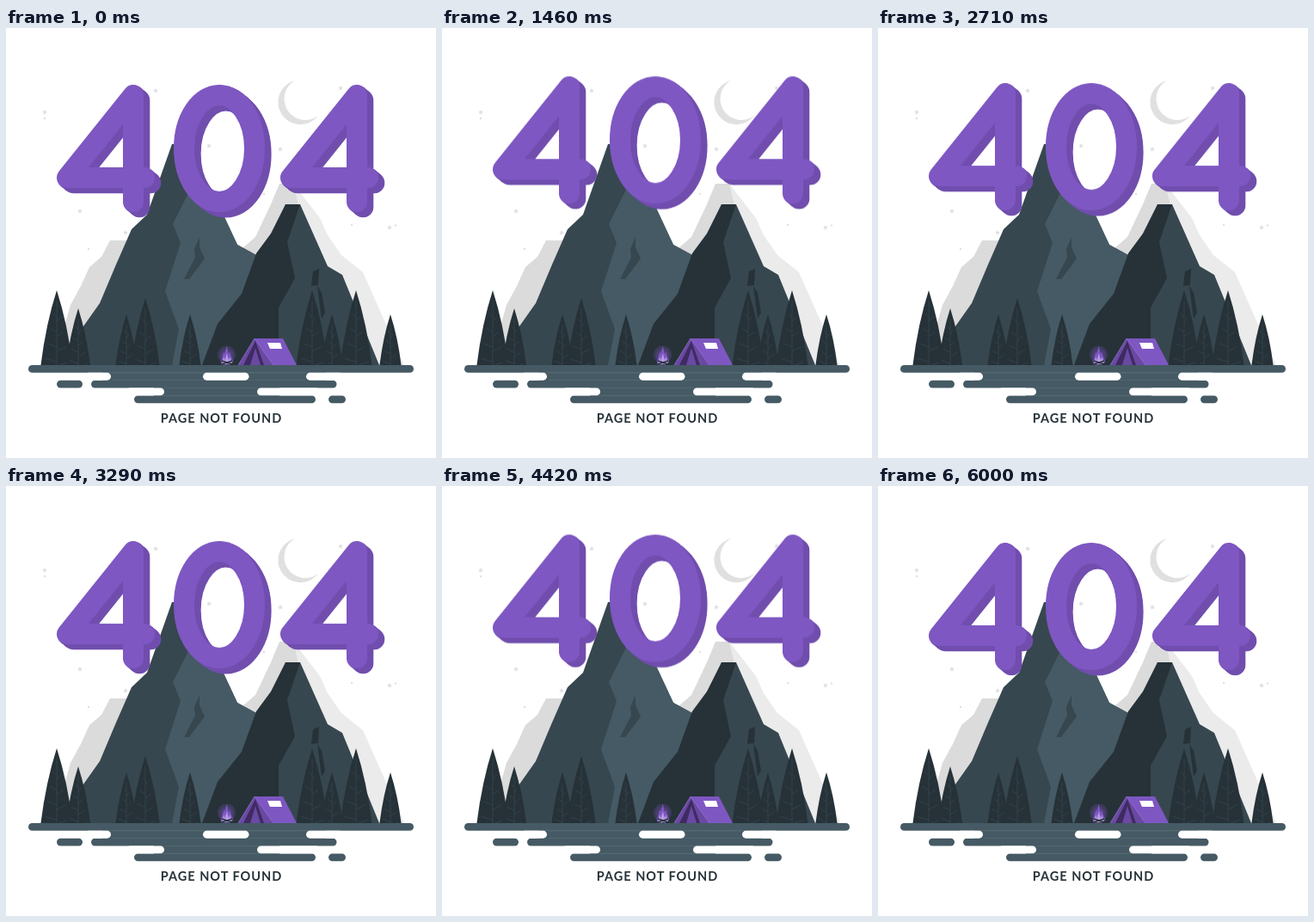
Recreate the animation shown at these times as an HTML page. Size 500 by 500 pixels, loop 6.04 s.

```html
<!DOCTYPE html>
<html lang="en">
<head>
<meta charset="utf-8">
<title>Page not found</title>
<style>
html, body { margin: 0; width: 100%; height: 100%; overflow: hidden; background: #fff; }
svg { display: block; width: 100vw; height: 100vh; }
.caption { font: 700 14.5px Lato, "Open Sans", sans-serif; letter-spacing: 1px; fill: #263238; }
#flame { transform-box: fill-box; transform-origin: center; }
</style>
</head>
<body>
<svg viewBox="0 0 500 500">
  <defs>
    <path id="four" d="M148 202V78L71 174H161" fill="none" stroke-width="24" stroke-linecap="round" stroke-linejoin="round"/>
    <ellipse id="zero" cx="248" cy="140" rx="41" ry="62" fill="none" stroke-width="24"/>
    <path id="tongue" d="M257 370Q258 378 261 383T257 391T253 383T257 370Z"/>
  </defs>

  <g id="sky" fill="#e0e0e0">
    <path d="M336 61A26 26 0 1 0 363 102A24.600 24.600 0 1 1 336 61Z"/>
  </g>

  <!-- far peaks -->
  <path fill="#dbdbdb" d="M121 247H146V392H55L75 322L87 300L97 278L111 266Z"/>
  <path fill="#ebebeb" d="M318 181H334L365 221L374 241L390 264L415 284L463 392H330Z"/>
  <path fill="#dbdbdb" d="M318 181H334L340 206V300H270L275 256L290 243L308 205Z"/>

  <!-- left peak -->
  <path fill="#37474f" d="M193 135H208L240 190L269 252L291 264L300 392H58L109 320L128 275L146 234L164 217Z"/>
  <path fill="#455a64" d="M208 135L240 190L269 252L291 264L300 392H193L201 350L185 306L203 250L194 228L215 186Z"/>
  <path fill="#37474f" d="M225 243L219 257L220 267L207 292H213L231 268L225 255Z"/>

  <!-- right peak -->
  <path fill="#37474f" d="M325 205H342L374 277L391 287L434 392H290Z"/>
  <path fill="#263238" d="M325 205H342L327 249L336 291L317 325V392H228L246 344L274 309L291 262L308 239Z"/>
  <path fill="#263238" d="M357 283L364 280L363 299L355 300ZM362 300L367 308L371 331L367 338Z"/>

  <g id="trees" fill="#263238"></g>

  <!-- tent -->
  <path fill="#7e57c2" d="M289 361H322L338 392H270Z"/>
  <path fill="#6a49a3" d="M289 361L270 392H311Z"/>
  <path fill="#3f2b61" d="M290 364L276 392H284L290 372L296 392H300Z"/>
  <path fill="none" stroke="#9c7fd0" stroke-width=".6" d="M289 361L311 392M289 361L270 392"/>
  <path fill="#fff" d="M304 366H319L321 373H307Z"/>

  <!-- campfire -->
  <circle cx="256.500" cy="380" r="10.500" fill="#7e57c2" opacity=".25"/>
  <circle cx="256.500" cy="381" r="8" fill="#7e57c2" opacity=".2"/>
  <g id="flame"></g>
  <path stroke="#263238" stroke-width="1.500" d="M251 391L263 387M251 387L263 391"/>

  <g id="lake"></g>
  <g id="digits"></g>

  <text class="caption" x="250.500" y="458.500" text-anchor="middle">PAGE NOT FOUND</text>
</svg>
<script>
const $ = id => document.getElementById(id);

function add(parent, tag, attrs) {
  const el = document.createElementNS('http://www.w3.org/2000/svg', tag);
  for (const key in attrs) el.setAttribute(key, attrs[key]);
  parent.append(el);
  return el;
}

let seed = 7;
function random(min, max) {
  seed = seed * 16807 % 2147483647;
  return min + (max - min) * seed / 2147483647;
}

function star(x, y, r = 3) {
  const points = Array.from({ length: 10 }, (_, i) => {
    const a = i * Math.PI / 5, d = i % 2 ? r * 0.5 : r;
    return [x + d * Math.sin(a), y - d * Math.cos(a)];
  });
  add($('sky'), 'polygon', { points: points.join(' ') });
}
for (const [x, y] of [[45, 98], [174, 73], [389, 70], [86, 213], [139, 238], [236, 137], [319, 141], [446, 232]]) {
  star(x, y);
}
for (let i = 0; i < 9; i++) {
  add($('sky'), 'circle', { cx: 45 + 51 * i, cy: random(105, 270), r: 1.2 });
}

function tree(x, height) {
  const top = 392 - height, w = height * 0.213, mid = top + height * 0.45;
  add($('trees'), 'path', {
    d: `M${x} ${top}Q${x + w * 0.68} ${mid} ${x + w} 392H${x - w}Q${x - w * 0.68} ${mid} ${x} ${top}Z`
  });
  let twigs = `M${x} ${top + 12}V392`;
  for (let k = 0.3; k < 0.95; k += 0.2) {
    const y = top + height * k, d = w * k * 0.8;
    twigs += `M${x} ${y + 5}l${-d} -4M${x} ${y + 10}l${d} -5`;
  }
  add($('trees'), 'path', { d: twigs, fill: 'none', stroke: '#455a64', 'stroke-width': 0.4 });
}
for (const x of [140, 214, 379, 447]) tree(x, 59);
for (const x of [59, 356, 407]) tree(x, 87);
tree(84, 66);
tree(162, 78);

for (const [scale, fill] of [[1, '#7e57c2'], [0.6, '#b69ce3']]) {
  for (const side of [-1, 1, 0]) {
    const size = scale * (side ? 0.7 : 1);
    add($('flame'), 'use', {
      href: '#tongue', fill,
      transform: `translate(${257 + side * 3.5} 391) scale(${size}) translate(-257 -391)`
    });
  }
}

// lake: stacked rows, with white pills cutting hollow ends
const rowY = row => 392 + 8.85 * row;

function pill(row, x1, x2, fill = '#455a64') {
  add($('lake'), 'rect', { x: x1, y: rowY(row), width: x2 - x1, height: 8.8, rx: 4.4, fill });
}
function slab(row, x1, x2) {
  add($('lake'), 'rect', { x: x1, y: rowY(row) - 0.5, width: x2 - x1, height: 9.8, fill: '#455a64' });
  for (const edge of [row, row + 1]) {
    add($('lake'), 'path', { d: `M${x1 + 12} ${rowY(edge)}H${x2 - 24}`, stroke: '#71828a', 'stroke-width': 0.5 });
  }
}
slab(1, 112, 372);
slab(3, 172, 318);
pill(0, 26, 474);
pill(2, 59, 89);
pill(2, 99, 384.5);
pill(4, 149, 360);
pill(4, 375, 395);
pill(1, 92, 122, '#fff');
pill(1, 229, 282.5, '#fff');
pill(1, 349, 392, '#fff');
pill(3, 140, 184, '#fff');
pill(3, 292, 365, '#fff');

// solid digits: shaded depth behind a flat face
function digit(id, shift, depth) {
  const g = add($('digits'), 'g', { transform: `translate(${shift} 0)` });
  const steps = 14;
  for (let i = steps; i >= 0; i--) {
    add(g, 'use', {
      href: '#' + id, x: depth * i / steps, y: depth * 0.85 * i / steps,
      stroke: i ? '#714eae' : '#7e57c2'
    });
  }
}
digit('four', 0, 7.3);
digit('zero', 0, 7.6);
digit('four', 260, 7.3);

// two 3 s cycles, then a short rest
const cycle = 3000, loop = 2 * cycle + 40;

function play(el, stepsPerCycle, pose) {
  const frames = [];
  for (let i = 0; i <= 2 * stepsPerCycle; i++) {
    frames.push({ offset: i * cycle / stepsPerCycle / loop, transform: pose(i) });
  }
  frames.push({ offset: 1, transform: pose(0) });
  el.animate(frames, { duration: loop, iterations: Infinity });
}
play($('digits'), 2, i => `translateY(${i % 2 ? -10 : 0}px)`);
play($('flame'), 4, i => `rotate(${Math.round(Math.sin(i * Math.PI / 2))}deg)`);
</script>
</body>
</html>
```
